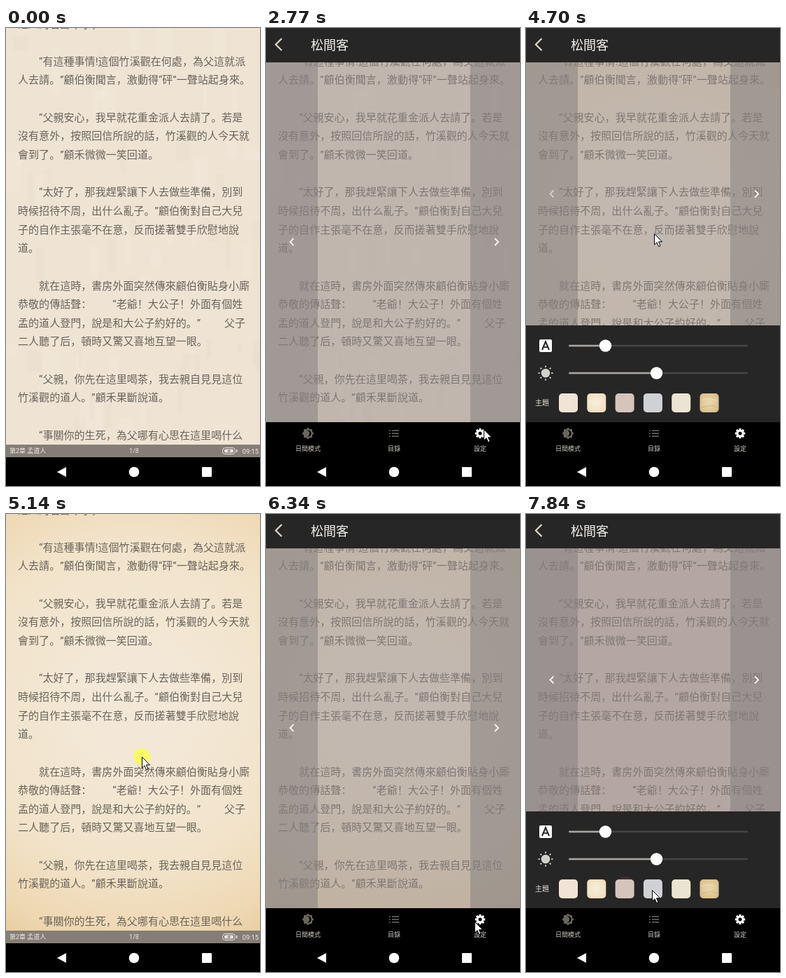
Recreate the animation shown at these times as an HTML page with a canvas. Size 363x653 px, loop 8 s.

```html
<!DOCTYPE html>
<html lang="zh">
<head>
<meta charset="utf-8">
<style>
html, body { margin: 0; width: 100%; height: 100%; overflow: hidden; background: #000; }
canvas { display: block; }
</style>
</head>
<body>
<canvas id="stage" width="363" height="653"></canvas>
<script>
const W = 363, H = 653, LOOP = 8000;
const ctx = document.getElementById('stage').getContext('2d');
const FONT = 'Roboto, "Noto Sans CJK SC", "Noto Sans CJK TC", "Noto Sans CJK", sans-serif';

const LINES = [
  '　　“有這種事情!這個竹溪觀在何處，為父這就派',
  '人去請。”顧伯衡聞言，激動得“砰”一聲站起身來。',
  '',
  '　　“父親安心，我早就花重金派人去請了。若是',
  '沒有意外，按照回信所說的話，竹溪觀的人今天就',
  '會到了。”顧禾微微一笑回道。',
  '',
  '　　“太好了，那我趕緊讓下人去做些準備，別到',
  '時候招待不周，出什么亂子。”顧伯衡對自己大兒',
  '子的自作主張毫不在意，反而搓著雙手欣慰地說',
  '道。',
  '',
  '　　就在這時，書房外面突然傳來顧伯衡貼身小廝',
  '恭敬的傳話聲：　　  “老爺！大公子！外面有個姓',
  '孟的道人登門，說是和大公子約好的。”　　 父子',
  '二人聽了后，頓時又驚又喜地互望一眼。',
  '',
  '　　“父親，你先在這里喝茶，我去親自見見這位',
  '竹溪觀的道人。”顧禾果斷說道。',
  '',
  '　　“事關你的生死，為父哪有心思在這里喝什么'
];

// Pointer way-points: time, x, y
const PATH = [
  [460, 313, 655], [1240, 258, 480], [1290, 256, 478], [1900, 181, 372],
  [2180, 181, 372], [2770, 311, 572], [3020, 311, 572], [3450, 190, 498],
  [3810, 102, 534], [4240, 102, 534], [4700, 183, 293], [5010, 194, 346],
  [5300, 194, 346], [5890, 299, 582], [5970, 298, 581], [6660, 298, 581],
  [6830, 142, 535], [7390, 143, 535], [7840, 180, 536]
];
const CLICKS = [[2000, 2180], [2840, 3020], [3810, 3860], [5010, 5250], [6270, 6340], [6830, 7050]];
const MENU = [[2000, 5010], [5250, LOOP]];
const PANEL = [[2840, 5010], [6390, LOOP]];

const within = (t, spans) => spans.some(([a, b]) => t >= a && t < b);
const clamp = v => Math.max(0, Math.min(1, v));

function pointerAt(t) {
  const next = PATH.findIndex(p => p[0] > t);
  if (next === 0) return PATH[0].slice(1);
  if (next < 0) return PATH[PATH.length - 1].slice(1);
  const [t0, x0, y0] = PATH[next - 1], [t1, x1, y1] = PATH[next];
  const u = (t - t0) / (t1 - t0), k = u * u * (3 - 2 * u);
  return [Math.round(x0 + (x1 - x0) * k), Math.round(y0 + (y1 - y0) * k)];
}

function rect(x, y, w, h, color, radius = 0) {
  ctx.fillStyle = color;
  ctx.beginPath();
  ctx.roundRect(x, y, w, h, radius);
  ctx.fill();
}

function disc(x, y, r, color) {
  ctx.fillStyle = color;
  ctx.beginPath();
  ctx.arc(x, y, r, 0, 7);
  ctx.fill();
}

function trace(points) {
  ctx.beginPath();
  points.forEach(([x, y]) => ctx.lineTo(x, y));
}

function line(points, color, width) {
  trace(points);
  ctx.strokeStyle = color;
  ctx.lineWidth = width;
  ctx.stroke();
}

function polygon(points, color) {
  trace(points);
  ctx.fillStyle = color;
  ctx.fill();
}

// Text placed by the vertical middle of its ideographs
function text(str, x, middle, size, color, align = 'left') {
  ctx.font = `${size}px ${FONT}`;
  ctx.textAlign = align;
  ctx.fillStyle = color;
  ctx.fillText(str, x, middle + size * 0.38);
}

function spokes(x, y, count, r0, r1, color, width) {
  for (let i = 0; i < count; i++) {
    const a = i * 2 * Math.PI / count, c = Math.cos(a), s = Math.sin(a);
    line([[x + c * r0, y + s * r0], [x + c * r1, y + s * r1]], color, width);
  }
}

function plainPaper() {
  rect(0, 0, W, 594, '#efe4d4');
  let seed = 11;
  const random = () => (seed = seed * 16807 % 2147483647) / 2147483647;
  for (let i = 0; i < 70; i++) {
    const tint = i % 2 ? 'rgba(255,248,236,.08)' : 'rgba(205,184,158,.05)';
    rect(random() * W - 8, random() * 600 - 20, 5 + random() * 20, 15 + random() * 60, tint, 5);
  }
}

function parchment() {
  const glow = ctx.createRadialGradient(185, 270, 60, 185, 270, 400);
  glow.addColorStop(0, '#f3e8d8');
  glow.addColorStop(0.5, '#f2e3ca');
  glow.addColorStop(0.8, '#eed8b3');
  glow.addColorStop(1, '#e4c695');
  rect(0, 0, W, 594, glow);
}

function page(t) {
  t < 3860 ? plainPaper() : parchment();
  ctx.globalAlpha = clamp((t - 6980) / 230);
  rect(0, 0, W, 594, '#d5c5bd');
  ctx.globalAlpha = 1;
  text('道人的名聲不小，', 17, -6, 15.05, '#6a645c');
  LINES.forEach((str, i) => text(str, 17, 47 + i * 26.65, 15.05, '#6a645c'));
}

function statusBar() {
  rect(0, 594, W, 18, '#857e76');
  text('第2章 孟道人', 5, 603, 9, '#f0ece6');
  text('1/8', 183, 603, 9, '#f0ece6', 'center');
  text('09:15', 361, 603, 9.3, '#f0ece6', 'right');
  ctx.strokeStyle = '#e8e4de';
  ctx.lineWidth = 1;
  ctx.beginPath();
  ctx.roundRect(309.5, 598.5, 18, 9, 4);
  ctx.stroke();
  rect(312, 600.5, 13, 5, '#e8e4de', 2);
  rect(329, 601, 1.5, 4, '#e8e4de');
  polygon([[320, 600], [316, 603.5], [318.5, 603.5], [317, 606.5], [321.5, 602.6], [319, 602.6]], '#857e76');
}

function navigation() {
  rect(0, 612, W, 41, '#000');
  polygon([[73, 633], [86, 626], [86, 640]], '#fff');
  disc(183, 633, 7.3, '#fff');
  rect(280, 626, 14, 14, '#fff', 1);
}

function arrows(y, dimLeft) {
  line([[39.5, y - 5], [34.5, y], [39.5, y + 5]], dimLeft ? '#d6cec6' : '#f6f4f2', 1.8);
  line([[327, y - 5], [332, y], [327, y + 5]], '#f6f4f2', 1.8);
}

function brightnessIcon(x, y, color) {
  rect(x - 6, y - 6, 12, 12, color);
  ctx.save();
  ctx.translate(x, y);
  ctx.rotate(Math.PI / 4);
  rect(-6, -6, 12, 12, color);
  ctx.restore();
  disc(x, y, 4.6, '#000');
  disc(x - 2.4, y, 4.6, color);
}

function menu(panelOpen, dimLeft) {
  rect(0, 49, W, 513, 'rgba(147,138,138,.5)');
  rect(0, 49, 74, 513, 'rgba(130,127,126,.5)');
  rect(292, 49, 71, 513, 'rgba(130,127,126,.5)');
  arrows(panelOpen ? 236.5 : 305, dimLeft);

  rect(0, 0, W, 49, '#262626');
  line([[22.5, 15], [14, 23.5], [22.5, 32]], '#d8d3c4', 2.3);
  text('松間客', 64, 24, 18, '#f2f0ec');

  rect(0, 562, W, 50, '#000');
  const dim = '#69665d';
  brightnessIcon(60, 578, dim);
  for (const y of [574, 578, 582]) {
    rect(176, y - 0.8, 2, 1.6, dim);
    rect(180, y - 0.8, 10, 1.6, dim);
  }
  spokes(306, 578, 8, 3, 7.2, '#fff', 3);
  disc(306, 578, 5.5, '#fff');
  disc(306, 578, 2.5, '#000');
  text('日間模式', 60, 600, 9, '#d0ccc0', 'center');
  text('目錄', 183, 600, 9, '#d0ccc0', 'center');
  text('設定', 306, 600, 9, '#d0ccc0', 'center');
}

function slider(y, knob) {
  rect(61, y - 1.3, 256, 2.6, '#474645', 1.3);
  rect(61, y - 1.3, knob - 61, 2.6, '#aaa6a0', 1.3);
  disc(knob, y, 8.7, '#fff');
}

function swatchGradient(x, inner, outer) {
  const g = ctx.createRadialGradient(x + 13, 534, 3, x + 13, 534, 19);
  g.addColorStop(0, inner);
  g.addColorStop(1, outer);
  return g;
}

function panel(t) {
  rect(0, 424, W, 138, '#262626');
  rect(19, 444, 18, 18, '#fff', 2);
  line([[23, 459], [28, 447], [33, 459]], '#262626', 2);
  line([[25, 455], [31, 455]], '#262626', 1.8);
  slider(453, 113.5);

  disc(28, 492, 6.3, '#d2d0cc');
  spokes(28, 492, 8, 8.2, 10.5, '#e2e0dc', 1.7);
  slider(492, 186.5);

  text('主題', 13, 534.5, 10, '#e4e0d8');
  if (t >= 7050) disc(142, 530, 13, '#393231');
  const colors = ['#f1e4d6', swatchGradient(87.3, '#f7ecda', '#efd9b3'), '#d5c4bb',
    '#d0d1d4', '#ebe4d2', swatchGradient(248.5, '#e8d4aa', '#d5b980')];
  colors.forEach((color, i) => rect(47 + i * 40.3, 521, 27, 27, color, 5));
  line([[251, 531], [260, 528], [273, 531]], 'rgba(255,240,205,.5)', 1.2);
  line([[251, 541], [263, 538], [273, 540]], 'rgba(180,145,90,.35)', 1.2);
}

function pointer(x, y, clicked) {
  if (clicked) disc(x, y, 12, 'rgba(253,250,88,.85)');
  ctx.save();
  ctx.translate(x, y);
  const shape = [[0.5, 0.5], [0.5, 16], [4, 12.7], [6.6, 18.6], [9, 17.5], [6.5, 11.8], [11.5, 11.8], [0.5, 0.5]];
  polygon(shape, '#fff');
  line(shape, '#000', 1);
  ctx.restore();
}

function draw(now) {
  const t = now % LOOP;
  page(t);
  statusBar();
  const panelOpen = within(t, PANEL);
  if (within(t, MENU)) menu(panelOpen, t >= 3860 && t < 5010);
  if (panelOpen) panel(t);
  navigation();
  pointer(...pointerAt(t), within(t, CLICKS));
}

const start = performance.now();
function tick() {
  draw(performance.now() - start);
  requestAnimationFrame(tick);
}
tick();
</script>
</body>
</html>
```
